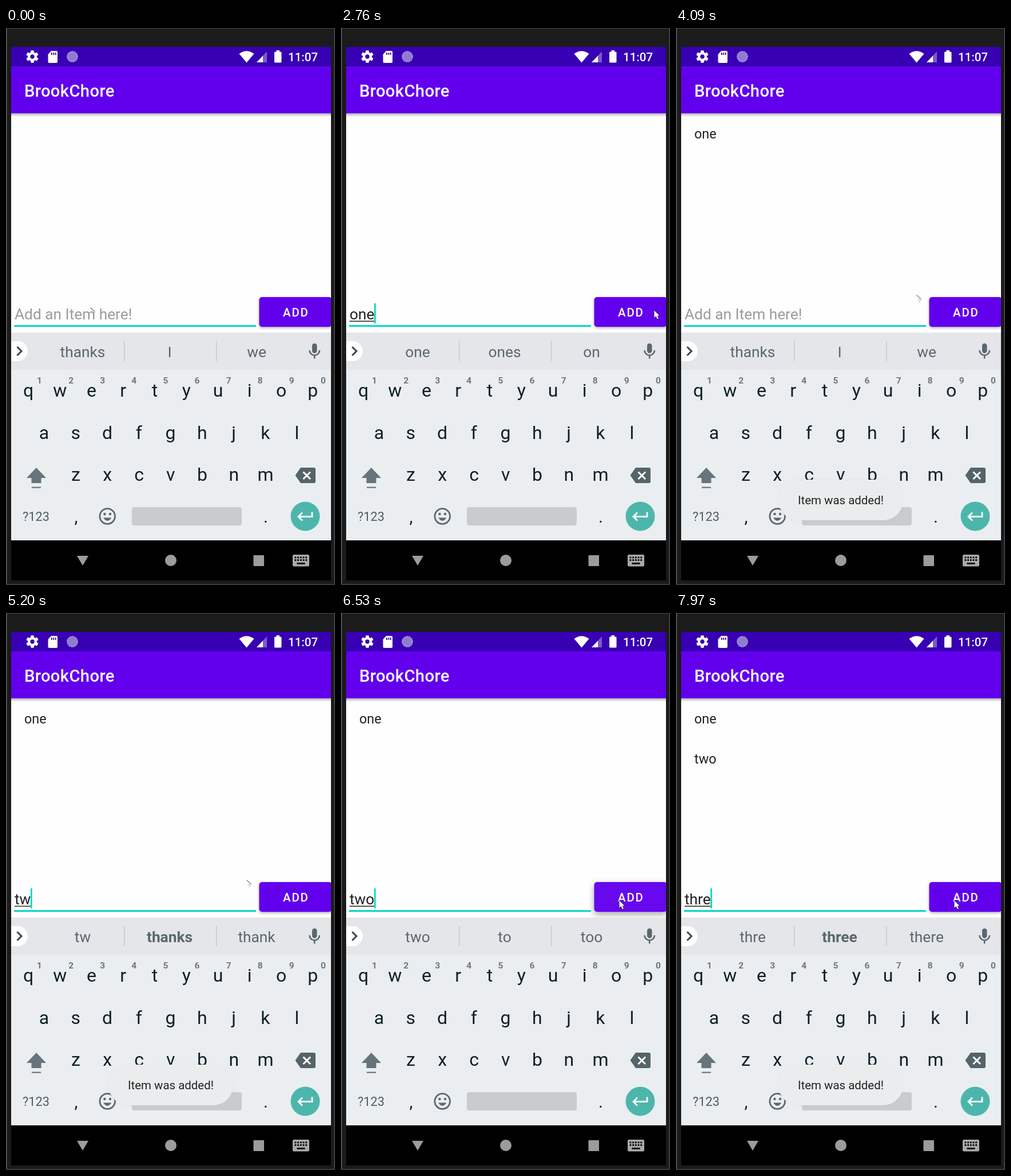
An HTML page with a canvas that plays this animation: 575 px wide and 973 px high, repeating every 8000 ms.

```html
<!DOCTYPE html>
<html lang="en">
<head>
<meta charset="utf-8">
<title>To-do list</title>
<style>
html, body { margin: 0; width: 100%; height: 100%; overflow: hidden; background: #1b1b1b; }
canvas { display: block; width: 575px; height: 973px; }
</style>
</head>
<body>
<canvas id="stage" width="575" height="973"></canvas>
<script>
const ctx = document.getElementById('stage').getContext('2d');
const LOOP = 8000;
const TEAL = '#03dac5', INK = '#0f2027', MUTED = '#5a6770';
const IDLE = ['thanks', 'I', 'we'];
const T_WORDS = ['thanks', 'thank'];

const start = {
  typed: '', caret: false, items: [], words: IDLE, bold: false,
  mouse: ['beam', 147, 488], toast: 0, glow: 0, lift: 0
};

// Each step overrides part of the state from its time on.
const steps = [
  [1100, { caret: true }],
  [1350, { typed: 'o', words: ['o', 'of', 'on'] }],
  [1630, { typed: 'on', words: ['on', 'one', 'only'] }],
  [1780, { typed: 'one', words: ['one', 'ones', 'on'] }],
  [2310, { caret: false, mouse: ['beam', 421, 435] }],
  [2450, { mouse: ['arrow', 544, 468] }],
  [2610, { mouse: ['arrow', 549, 493] }],
  [2760, { caret: true, mouse: ['arrow', 547, 493] }],
  [3160, { glow: .06, lift: 1 }],
  [3280, { typed: '', items: ['one'], words: IDLE, glow: .24 }],
  [3410, { mouse: ['beam', 424, 466], toast: .5, glow: .23, lift: 0 }],
  [3530, { toast: .9, glow: .08 }],
  [3650, { mouse: ['beam', 420, 466], toast: 1, glow: 0 }],
  [4090, { caret: false }],
  [4620, { caret: true }],
  [4770, { typed: 't', words: ['t', ...T_WORDS], bold: true }],
  [5050, { typed: 'tw', words: ['tw', ...T_WORDS] }],
  [5350, { typed: 'two', words: ['two', 'to', 'too'], bold: false, toast: .85 }],
  [5500, { toast: .45 }],
  [5620, { toast: .15 }],
  [5740, { toast: 0, caret: false }],
  [6140, { mouse: ['beam', 432, 470] }],
  [6260, { caret: true, mouse: ['arrow', 492, 496] }],
  [6380, { mouse: ['arrow', 486, 502] }],
  [6530, { glow: .03, lift: 1 }],
  [6650, { typed: '', glow: .22 }],
  [6800, { items: ['one', 'two'], words: IDLE, glow: .24, lift: .5 }],
  [6920, { toast: .55, glow: .13, lift: 0 }],
  [7040, { toast: 1, glow: .05 }],
  [7160, { glow: 0 }],
  [7310, { typed: 't' }],
  [7430, { words: ['t', ...T_WORDS], bold: true }],
  [7570, { typed: 'th', words: ['th', ...T_WORDS] }],
  [7690, { typed: 'thr', words: ['thr', 'through', 'three'] }],
  [7970, { typed: 'thre', words: ['thre', 'three', 'there'] }]
];

function stateAt(t) {
  return Object.assign({}, start, ...steps.filter(s => s[0] <= t).map(s => s[1]));
}

function rect(x, y, w, h, color, r = 0) {
  ctx.fillStyle = color;
  ctx.beginPath();
  ctx.roundRect(x, y, w, h, r);
  ctx.fill();
}

function disc(x, y, r, color) {
  ctx.fillStyle = color;
  ctx.beginPath();
  ctx.arc(x, y, r, 0, Math.PI * 2);
  ctx.fill();
}

function shape(d, fill, stroke, width = 1) {
  const path = new Path2D(d);
  if (stroke) {
    ctx.strokeStyle = stroke;
    ctx.lineWidth = width;
    ctx.stroke(path);
  }
  if (fill) {
    ctx.fillStyle = fill;
    ctx.fill(path);
  }
}

function text(str, x, y, size, color, { weight = 400, align = 'left', gap = 0 } = {}) {
  ctx.font = `${weight} ${size}px Roboto, sans-serif`;
  ctx.letterSpacing = gap + 'px';
  ctx.textAlign = align;
  ctx.fillStyle = color;
  ctx.fillText(str, x, y);
  const width = ctx.measureText(str).width;
  ctx.letterSpacing = '0px';
  return width;
}

function shade(y, h, alpha) {
  const g = ctx.createLinearGradient(0, y, 0, y + h);
  g.addColorStop(0, `rgba(0,0,0,${alpha})`);
  g.addColorStop(1, 'rgba(0,0,0,0)');
  ctx.fillStyle = g;
  ctx.fillRect(9, y, 559, h);
}

function drawFrame() {
  rect(0, 0, 575, 973, '#1b1b1b');
  rect(0, 0, 575, 1, '#4a4a4a');
  rect(0, 0, 1.5, 973, '#656565');
  rect(573.5, 0, 1.5, 973, '#4c4c4c');
  rect(0, 971, 575, 2, '#3a3a3a');
}

function drawGear(x, y) {
  ctx.save();
  ctx.translate(x, y);
  for (let i = 0; i < 6; i++) {
    rect(-2.8, -10.8, 5.6, 6, '#fff', 1);
    ctx.rotate(Math.PI / 3);
  }
  disc(0, 0, 8, '#fff');
  disc(0, 0, 3.7, '#3700b3');
  ctx.restore();
}

function drawStatus() {
  rect(9, 33, 559, 35, '#3700b3');
  drawGear(46, 50);
  shape('M79 40H88Q90 40 90 42V59Q90 61 88 61H75.5Q73.5 61 73.5 59V46Z', '#fff');
  for (let i = 0; i < 3; i++) rect(79 + i * 3.4, 43, 1.8, 4, '#3700b3');
  disc(116, 50, 9, '#8f7bd0');
  ctx.setLineDash([1.5, 1.5]);
  shape('M125 50A9 9 0 1 1 107 50A9 9 0 1 1 125 50', null, '#cbbfeb', 1.8);
  ctx.setLineDash([]);
  shape('M420.5 60.5L407.5 45Q420.5 35.5 433.5 45Z', '#fff');
  shape('M438 60H456V41Z', '#7c5bcb');
  shape('M438 60H449V48.5Z', '#fff');
  rect(469, 41.5, 12.5, 19, '#fff', 1.5);
  rect(472.5, 39, 5.5, 4, '#fff');
  text('11:07', 493, 58, 20.5, '#fff', { weight: 500 });
}

function drawButton(s) {
  const mix = c => Math.round(c + (255 - c) * s.glow);
  ctx.save();
  ctx.beginPath();
  ctx.rect(9, 150, 559, 382);
  ctx.clip();
  ctx.shadowColor = `rgba(0,0,0,${.32 + .05 * s.lift})`;
  ctx.shadowBlur = 4 + 7 * s.lift;
  ctx.shadowOffsetY = 2 + 2 * s.lift;
  rect(442.5, 470, 127, 52, `rgb(${mix(98)},${mix(0)},${mix(238)})`, 5);
  ctx.restore();
  text('ADD', 484, 504, 20.4, '#fff', { weight: 500, gap: 1.82 });
}

function drawApp(s) {
  rect(9, 149, 559, 383, '#fefefe');
  shade(149, 6, .3);
  rect(9, 67, 559, 82, '#6200ee');
  text('BrookChore', 32, 120, 29.2, '#fff', { weight: 500, gap: .36 });
  s.items.forEach((item, i) => text(item, 32, 193 + 70 * i, 23.4, '#202020'));

  let width = 0;
  if (s.typed) {
    width = text(s.typed, 15, 509, 26.25, '#202020');
    rect(15, 511.5, width, 1.4, '#202020');
  } else {
    text('Add an Item here!', 15, 509, 26.25, '#9b9b9b');
  }
  rect(14, 519, 423, 3, TEAL);
  if (s.caret) rect(14.6 + width, 481, 2.8, 35, TEAL);
  drawButton(s);
}

function drawMic() {
  rect(535, 551, 8.5, 17, MUTED, 4.2);
  shape('M530.5 563A8.7 8.7 0 0 0 548 563M539.2 572V577.5', null, MUTED, 2.6);
}

function drawStrip(s) {
  rect(9, 532, 559, 65, '#e4e6e9');
  rect(9, 547, 29, 35, '#fff', [0, 17.5, 17.5, 0]);
  shape('M19.5 557L27 564.5L19.5 572', null, '#37474f', 3);
  rect(206, 547, 1.5, 35, '#c6cacd');
  rect(367, 547, 1.5, 35, '#c6cacd');
  s.words.forEach((word, i) => text(word, 134 + 152 * i, 574.5, 26.3, MUTED,
    { align: 'center', weight: s.bold && i === 1 ? 700 : 400 }));
  drawMic();
}

function keyRow(letters, x, y) {
  [...letters].forEach((c, i) => text(c, x + 55.25 * i, y, 32, INK, { align: 'center' }));
}

function drawKeys() {
  rect(9, 597, 559, 298, '#eaeef0');
  keyRow('qwertyuiop', 39, 644);
  keyRow('asdfghjkl', 66.5, 717.5);
  keyRow('zxcvbnm', 122, 791);
  [...'1234567890'].forEach((c, i) =>
    text(c, 58.5 + 55.1 * i, 621, 15.5, '#6d787e', { align: 'center', weight: 700 }));

  shape('M53 768L70 786H61.5V795H44.5V786H36Z', '#66747b');
  rect(45, 801.5, 16, 2.2, '#66747b');

  shape('M515 768H538Q541 768 541 771V792Q541 795 538 795H515L505.5 781.5Z', '#55636b');
  shape('M519.5 775.5L532 788M532 775.5L519.5 788', null, '#fff', 3);

  text('?123', 29, 861, 21.8, '#4f5d65');
  text(',', 122.5, 863.5, 30, INK, { align: 'center' });
  text('.', 454, 863.5, 30, INK, { align: 'center' });

  shape('M190.5 853A13.3 13.3 0 1 1 163.9 853A13.3 13.3 0 1 1 190.5 853', null, MUTED, 2.8);
  disc(172.4, 849, 2.2, MUTED);
  disc(182, 849, 2.2, MUTED);
  shape('M170 855.5Q177.2 866 184.4 855.5Z', MUTED);

  rect(220, 837, 192, 32, '#c8cccf', 4);
  disc(523, 853, 25.5, '#4db6ac');
  shape('M535 845.5V853.5H512M518 846.5L511 853.5L518 860.5', null, '#fff', 2.8);
}

function drawNav() {
  const grey = '#9c9c9c';
  rect(9, 895, 559, 70, '#000');
  shape('M124 922H144L134 939Z', grey);
  disc(288, 930, 10, grey);
  rect(432.5, 921, 18.5, 19, grey, 1);
  rect(501, 920, 29, 20.5, '#a9a9a9', 2);
  for (let i = 0; i < 10; i++) rect(504.5 + 4.7 * (i % 5), 923.5 + 4.6 * (i / 5 | 0), 2.8, 2.8, '#000');
  rect(508.5, 934, 14, 2.8, '#000');
}

function drawToast(alpha) {
  if (!alpha) return;
  ctx.save();
  ctx.globalAlpha = alpha;
  ctx.shadowColor = 'rgba(0,0,0,.04)';
  ctx.shadowBlur = 3;
  rect(179, 789, 218, 71, '#ebeced', 35);
  ctx.shadowColor = 'transparent';
  text('Item was added!', 213, 832, 20.45, '#222');
  ctx.restore();
}

function drawMouse([kind, x, y]) {
  ctx.save();
  ctx.translate(x, y);
  if (kind === 'arrow') {
    shape('M.5 .5V13L3.5 10.3L5.8 15.2L8 14.2L5.8 9.5H9.5Z', '#fff', '#222', 1.2);
  } else {
    shape('M.5 .5L8.5 7.5', null, '#333', 1);
    shape('M3 8.5L6 8L8.5 10.5M5 10.5L6 13', null, '#999', 1);
  }
  ctx.restore();
}

function draw(t) {
  const s = stateAt(t);
  drawFrame();
  drawStatus();
  drawApp(s);
  drawStrip(s);
  drawKeys();
  drawNav();
  drawToast(s.toast);
  drawMouse(s.mouse);
}

const began = performance.now();
function tick() {
  draw((performance.now() - began) % LOOP);
  requestAnimationFrame(tick);
}
tick();
</script>
</body>
</html>
```
